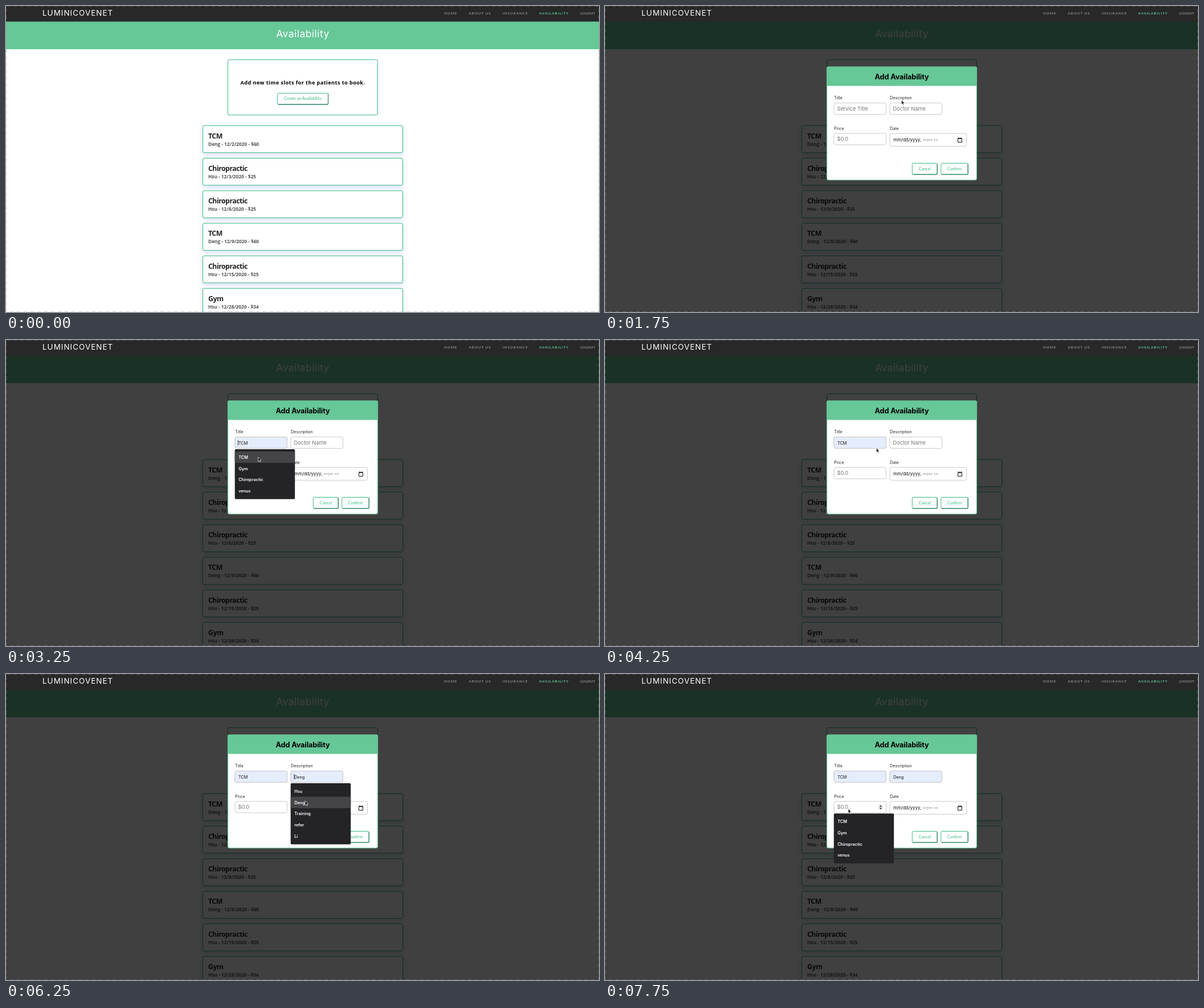
Recreate the animation shown at these times as an HTML page. Size 1041 by 538 pixels, loop 8000 ms.

```html
<!DOCTYPE html>
<html lang="en">
<head>
<meta charset="utf-8">
<title>Availability</title>
<style>
  html, body { margin: 0; width: 100%; height: 100%; overflow: hidden; background: #fff; }
  svg { display: block; width: 1041px; height: 538px; }
  text { font-family: Lato, sans-serif; white-space: pre; }
  .geo { font-family: Inter, sans-serif; }
  .hum { font-family: 'Open Sans', sans-serif; font-weight: 700; }
  .bold { font-weight: 700; }
  .semi { font-weight: 600; }
  .mid { text-anchor: middle; }
  .card { filter: drop-shadow(0 3px 4px rgba(90, 140, 210, .28)); }
</style>
</head>
<body>
<svg id="stage" viewBox="0 0 1041 538"></svg>
<script>
const LOOP = 8000, STEP = 250;
const GREEN = '#66c797', LINE = '#3cb97f', SHADE = '#1f6b4a';

const text = (x, y, size, str, fill, cls = '', gap = 0) =>
  `<text x="${x}" y="${y}" font-size="${size}" fill="${fill}" class="${cls}" letter-spacing="${gap}">${str}</text>`;
const rect = (x, y, w, h, fill, stroke = 'none', r = 0, width = 1) =>
  `<rect x="${x}" y="${y}" width="${w}" height="${h}" rx="${r}" fill="${fill}" stroke="${stroke}" stroke-width="${width}"/>`;
const path = (d, stroke, width = 1) =>
  `<path d="${d}" fill="none" stroke="${stroke}" stroke-width="${width}"/>`;
const group = (id, body) => `<g id="${id}">${body}</g>`;

function button(x, y, w, h, label, hot) {
  return rect(x, y, w, h, hot ? GREEN : '#fff', LINE, 2, 1) +
    path(`M${x + 1} ${y + h}H${x + w - 1}Q${x + w} ${y + h} ${x + w} ${y + h - 1}V${y + 1}`, SHADE, 1) +
    text(x + w / 2, y + h / 2 + 2.3, 7.2, label, hot ? '#fff' : LINE, 'mid');
}

function card([title, info], i) {
  const y = 210.3 + i * 57.25;
  return `<g class="card">${rect(345.5, y, 351, 47.5, '#fff', LINE, 2.5, 1)}</g>` +
    text(355, y + 22.2, 12.3, title, '#222', 'hum', -.5) +
    text(355, y + 35.4, 8.4, info, '#555', 'hum', -.05);
}

const field = (x, y, w, h, fill = '#fff') => rect(x, y, w, h, fill, '#c4c4c4', 2.5, .9);
const hint = (x, y, str) => text(x, y, 9.2, str, '#757575', 'geo');
const filled = (x, str) => field(x, 170.5, 91.5, 20, '#e5ecfb') + text(x + 6, 183.6, 7.3, str, '#111', 'geo');
const caret = x => path(`M${x} 176V185.5`, '#000', .8);

function menu(id, x, y, items) {
  return group(id, rect(x, y, 105.5, items.length * 19.8 + 8.5, '#242427', 'none', 2) +
    `<rect class="row" x="${x}" width="105.5" height="20" fill="#454548"/>` +
    items.map((s, i) => text(x + 6.5, y + 16.7 + i * 19.8, 7.3, s, '#fff', 'geo semi')).join(''));
}

const nav = [[769, 'HOME'], [812.5, 'ABOUT US'], [872, 'INSURANCE'], [936, 'AVAILABILITY'], [1008, 'LOGOUT']]
  .map(([x, s], i) => text(x, 14.8, 6.3, s, i == 3 ? '#5cc596' : '#8c8c8c', 'bold', i == 4 ? 0 : .95)).join('');

const cards = [
  ['TCM', 'Deng - 12/2/2020 - $60'], ['Chiropractic', 'Hsu - 12/3/2020 - $25'],
  ['Chiropractic', 'Hsu - 12/8/2020 - $25'], ['TCM', 'Deng - 12/9/2020 - $60'],
  ['Chiropractic', 'Hsu - 12/15/2020 - $25'], ['Gym', 'Hsu - 12/28/2020 - $34']
].map(card).join('');

const page = rect(0, 27, 1041, 49, GREEN) +
  text(521, 55, 17.5, 'Availability', '#fff', 'geo mid', .45) +
  rect(389.5, 94.4, 263, 97.2, '#fff', LINE, 2.5, 1) +
  text(521, 138, 9.2, 'Add new time slots for the patients to book.', '#000', 'hum mid', .4) +
  group('cold', button(476.5, 153.3, 89, 19.7, 'Create an Availability')) +
  group('hot', button(476.5, 153.3, 89, 19.7, 'Create an Availability', true)) + cards;

const services = ['TCM', 'Gym', 'Chiropractic', 'venus'];
const modal = rect(0, 27, 1041, 511, 'rgba(0,0,0,.75)') +
  rect(389.5, 107, 263, 199, '#fff', GREEN, 3, 1.2) +
  rect(389, 106.5, 264, 34, GREEN, 'none', 2) +
  text(521, 129, 12.7, 'Add Availability', '#000', 'geo bold mid', -.1) +
  [[402, 164, 'Title'], [500, 164, 'Description'], [402, 217.5, 'Price'], [500, 217.5, 'Date']]
    .map(([x, y, s]) => text(x, y, 7.2, s, '#222', 'geo')).join('') +
  field(402, 170.5, 91.5, 20) + hint(407.5, 183.7, 'Service Title') +
  field(500, 170.5, 91.5, 20) + hint(505.5, 183.7, 'Doctor Name') +
  field(402, 224, 91.5, 20) + hint(407.5, 237, '$0.0') +
  field(500, 224, 134.5, 22.5) + text(506, 238.4, 8, 'mm/dd/yyyy, --:-- --', '#111', 'geo') +
  path('M619.5 233.2H626.5V239.5H619.5ZM619.5 232.8H626.5M621 231V233M625 231V233', '#111', 1) +
  button(539.3, 276.5, 43.9, 19.7, 'Cancel') + button(589.8, 276.5, 47.4, 19.7, 'Confirm') +
  group('title', filled(402, 'TCM')) + group('doctor', filled(500, 'Deng')) +
  group('caret1', caret(407.5)) + group('caret2', caret(506)) +
  group('spin', rect(480, 229.5, 8, 9.5, '#eee', 'none', 1) +
    '<path d="M484 230.5l2.2 2.8h-4.4zM484 238l2.2-2.8h-4.4z" fill="#333"/>') +
  menu('menu1', 401.7, 192, services) +
  menu('menu2', 499.7, 192, ['Hsu', 'Deng', 'Training', 'refer', 'Li']) +
  menu('menu3', 401.7, 245.3, services);

const $ = id => document.getElementById(id);
$('stage').innerHTML = rect(0, 0, 1041, 538, '#fff') + page + group('modal', modal) +
  rect(0, 0, 1041, 27.4, '#282828') +
  text(64, 17.3, 13.4, 'LUMINICOVENET', '#fff', 'geo', 1.05) + nav +
  '<rect x=".5" y=".5" width="1040" height="537" fill="none" stroke="#999" stroke-opacity=".42" stroke-dasharray="7 5"/>' +
  group('cursor', '<path d="M0 0V7.6L1.7 6.1L2.9 8.8L4.2 8.2L3 5.6H5.4Z" fill="#000" stroke="#fff" stroke-width=".7"/>');

// Pointer waypoints: time, x, y
const route = [
  [250, 584, 163], [750, 527, 132], [1000, 527, 132], [1250, 523, 160], [1500, 520.5, 165.5],
  [1750, 520.5, 165.5], [2250, 522, 172], [2750, 444, 180], [3000, 443, 182], [3250, 442.5, 206],
  [3500, 442.5, 206], [4000, 455, 195], [4750, 519.5, 180], [5500, 519.5, 180], [6250, 525, 223],
  [6500, 525, 223], [7500, 428, 237], [7750, 427, 237]
];

function pointerAt(t) {
  const i = Math.max(1, route.findIndex(p => p[0] >= t));
  const [a, b] = [route[i - 1], route[i]];
  const k = Math.max(0, (t - a[0]) / (b[0] - a[0]));
  return [1, 2].map(n => a[n] + (b[n] - a[n]) * k);
}

const show = (id, on) => { $(id).style.display = on ? '' : 'none'; };

function draw(now) {
  const t = Math.floor(now % LOOP / STEP) * STEP;
  const within = (from, to = LOOP) => t >= from && t < to;
  const [x, y] = pointerAt(t);
  $('cursor').setAttribute('transform', `translate(${x} ${y})`);
  show('cursor', t >= 250);
  show('hot', within(1250, 1750));
  show('cold', !within(1250, 1750));
  show('modal', within(1750));
  show('title', within(3250));
  show('doctor', within(6250));
  show('caret1', within(3000, 3750));
  show('caret2', within(5000, 6500));
  show('spin', within(7250));
  show('menu1', within(3000, 3750));
  show('menu2', within(5000, 6500));
  show('menu3', within(7750));
  for (const [id, top] of [['menu1', 196], ['menu2', 196], ['menu3', 249.3]]) {
    const row = Math.floor((y - top) / 19.8), bar = $(id).querySelector('.row');
    bar.setAttribute('y', top + row * 19.8);
    bar.style.display = row < 0 ? 'none' : '';
  }
  requestAnimationFrame(draw);
}
requestAnimationFrame(draw);
</script>
</body>
</html>
```
